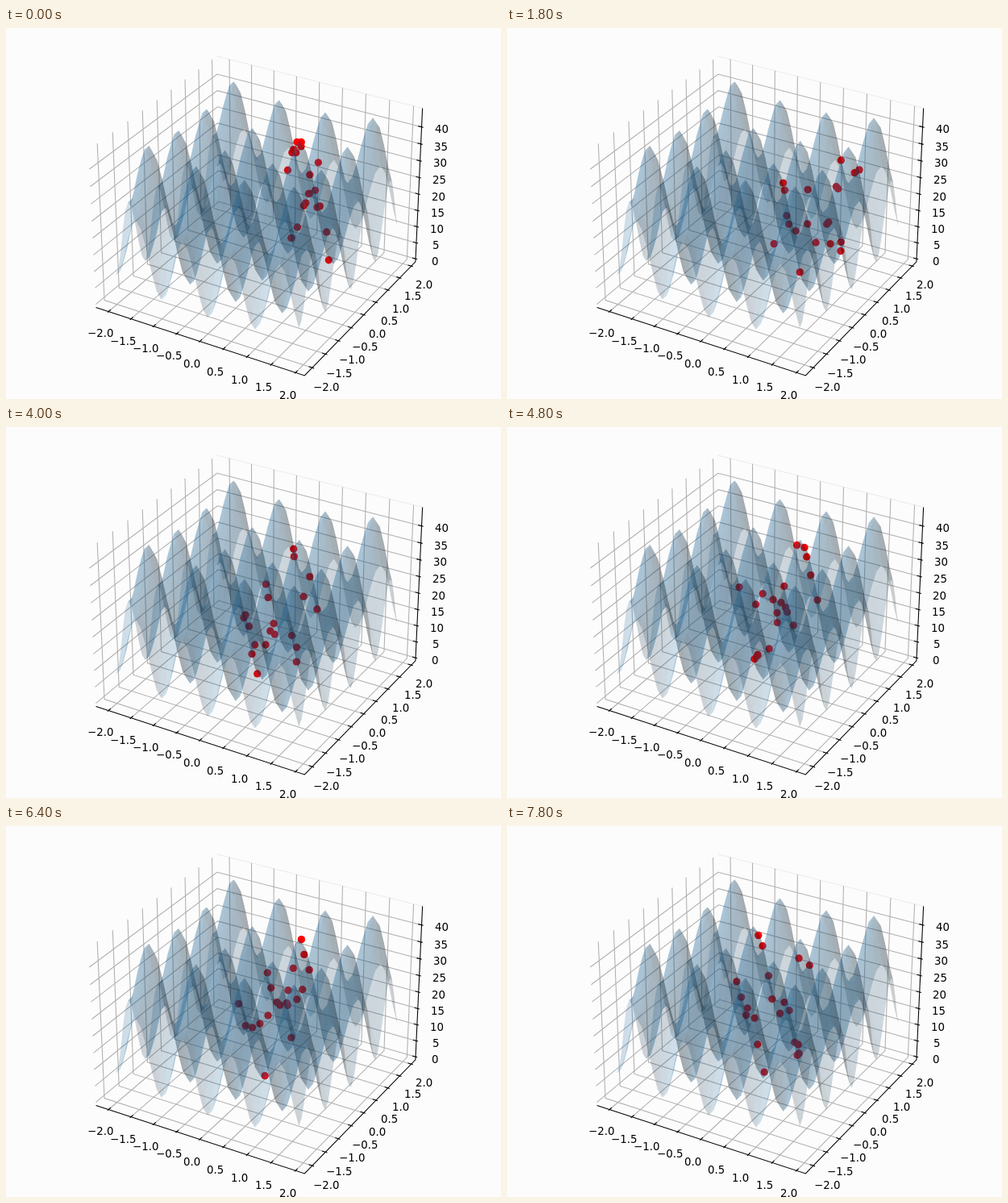
An HTML page with a canvas for the animation above (8 s loop, 614 by 460 pixels).

```html
<!DOCTYPE html>
<html lang="en">
<head>
<meta charset="utf-8">
<title>Particles on a rippled surface</title>
<style>
  html, body { margin: 0; width: 100%; height: 100%; overflow: hidden; background: #fcfcfc; }
  canvas { display: block; }
</style>
</head>
<body>
<canvas id="stage" width="614" height="460"></canvas>
<script>
const W = 614, H = 460, LOOP = 8000, STEP = 200;
const PANE = 0.5952, PANE_Z = 0.4464;   // half sizes of the axes box
const TICK = 0.0952, TICK_Z = 0.0714;   // a twelfth of the data range

// Camera: elevation 30°, azimuth -60°, distance 10.
const depth = ([x, y, z]) => 0.433 * x - 0.75 * y + 0.5 * z;
function project(p) {
  const [x, y, z] = p, k = 2490.8 / (10 - depth(p));
  return [313.4 + k * (0.866 * x + 0.5 * y),
          223.4 - k * (-0.25 * x + 0.433 * y + 0.866 * z)];
}

// Data values to box coordinates.
const unit = v => (v + 0.05) * 0.26641;
const unitZ = z => z / 44.5 * 0.8571 - 0.42857;
const ripple = v => 10 + v * v - 10 * Math.cos(2 * Math.PI * v);
const height = (x, y) => ripple(x) + ripple(y);
const onSurface = (x, y) => [unit(x), unit(y), unitZ(height(x, y))];

function layer(draw) {
  const canvas = document.createElement('canvas');
  canvas.width = W;
  canvas.height = H;
  draw(canvas.getContext('2d'));
  return canvas;
}

function trace(c, points) {
  c.beginPath();
  points.forEach(p => c.lineTo(...project(p)));
}

function line(c, color, ...points) {
  trace(c, points);
  c.strokeStyle = color;
  c.lineWidth = 1.07;
  c.stroke();
}

const axes = layer(c => {
  c.fillStyle = '#fcfcfc';
  c.fillRect(0, 0, W, H);
  const P = PANE, Q = PANE_Z, GRID = '#b0b0b0', INK = '#000';
  const halves = Array.from({ length: 9 }, (_, i) => i / 2 - 2);
  const fives = Array.from({ length: 9 }, (_, i) => i * 5);

  line(c, '#ececec', [-P, P, Q], [P, P, Q]);
  for (const v of halves) {
    const u = unit(v);
    line(c, GRID, [u, -P, -Q], [u, P, -Q], [u, P, Q]);
    line(c, GRID, [P, u, -Q], [-P, u, -Q], [-P, u, Q]);
  }
  for (const v of fives) {
    const u = unitZ(v);
    line(c, GRID, [-P, -P, u], [-P, P, u], [P, P, u]);
  }
  line(c, INK, [-P, -P, -Q], [P, -P, -Q], [P, P, -Q], [P, P, Q]);

  c.font = '13.33px "DejaVu Sans", sans-serif';
  c.fillStyle = INK;
  const label = (text, p) => {
    const [x, y] = project(p);
    c.fillText(text, Math.round(x - c.measureText(text).width / 2), Math.round(y + 11));
  };
  const outer = P + 0.1 * TICK, inner = P - 0.2 * TICK;
  const far = P + 0.8 * TICK, low = -Q - 0.8 * TICK_Z;
  for (const v of halves) {
    const u = unit(v), text = v.toFixed(1).replace('-', '\u2212');
    line(c, INK, [u, -outer, -Q], [u, -inner, -Q]);
    line(c, INK, [outer, u, -Q], [inner, u, -Q]);
    label(text, [u, -far, low]);
    label(text, [far, u, low]);
  }
  for (const v of fives) {
    const u = unitZ(v);
    line(c, INK, [outer, P, u], [inner, P, u]);
    label(v, [far, far, u]);
  }
});

const surface = layer(c => {
  const faces = [], h = 0.1;
  for (let i = 0; i < 39; i++) for (let j = 0; j < 39; j++) {
    const x = i * h - 2, y = j * h - 2;
    const dx = ripple(x + h) - ripple(x), dy = ripple(y + h) - ripple(y);
    const light = (2 * dx + 2 * dy + h) / 3 / Math.hypot(dx, dy, h);
    const points = [onSurface(x, y), onSurface(x + h, y), onSurface(x + h, y + h), onSurface(x, y + h)];
    faces.push({
      points,
      shade: 0.52 + 0.38 * light,
      depth: points.reduce((sum, p) => sum + depth(p), 0)
    });
  }
  faces.sort((a, b) => a.depth - b.depth);
  for (const f of faces) {
    const [r, g, b] = [31, 119, 180].map(v => Math.round(v * f.shade));
    c.fillStyle = `rgba(${r},${g},${b},0.2)`;
    trace(c, f.points);
    c.fill();
  }
});

// The swarm's middle and spread on the surface, in data units.
const swarmKeys = [
  { t: 0, x: 0.5, y: 0.8, spread: 0.27 },
  { t: 1800, x: 0.4, y: 0.6, spread: 0.75 },
  { t: 2800, x: -0.1, y: 0, spread: 0.85 },
  { t: 4000, x: 0.2, y: 0.2, spread: 0.45 },
  { t: 8000, x: 0.3, y: 0, spread: 0.5 }
];

function swarmAt(t) {
  const n = swarmKeys.findIndex(key => key.t > t);
  const a = swarmKeys[n - 1], b = swarmKeys[n], k = (t - a.t) / (b.t - a.t);
  const mix = name => a[name] + (b[name] - a[name]) * k;
  return { x: mix('x'), y: mix('y'), spread: mix('spread') };
}

let seed = 7;
const random = () => (seed = seed * 16807 % 2147483647) / 2147483647;
const particles = Array.from({ length: 20 }, () => ({
  reach: 0.4 + 1.4 * random(),
  phase: 2 * Math.PI * random(),
  turn: 0.004 * (random() - 0.5)
}));

const stage = document.getElementById('stage').getContext('2d');

function render() {
  const t = Math.floor(performance.now() % LOOP / STEP) * STEP;
  const swarm = swarmAt(t);
  stage.drawImage(axes, 0, 0);
  stage.fillStyle = '#f00';
  for (const { reach, phase, turn } of particles) {
    const angle = phase + turn * t, r = reach * swarm.spread;
    const spot = onSurface(swarm.x + r * Math.cos(angle), swarm.y + r * Math.sin(angle));
    stage.beginPath();
    stage.arc(...project(spot), 4.67, 0, 2 * Math.PI);
    stage.fill();
  }
  stage.drawImage(surface, 0, 0);
  requestAnimationFrame(render);
}
render();
</script>
</body>
</html>
```
